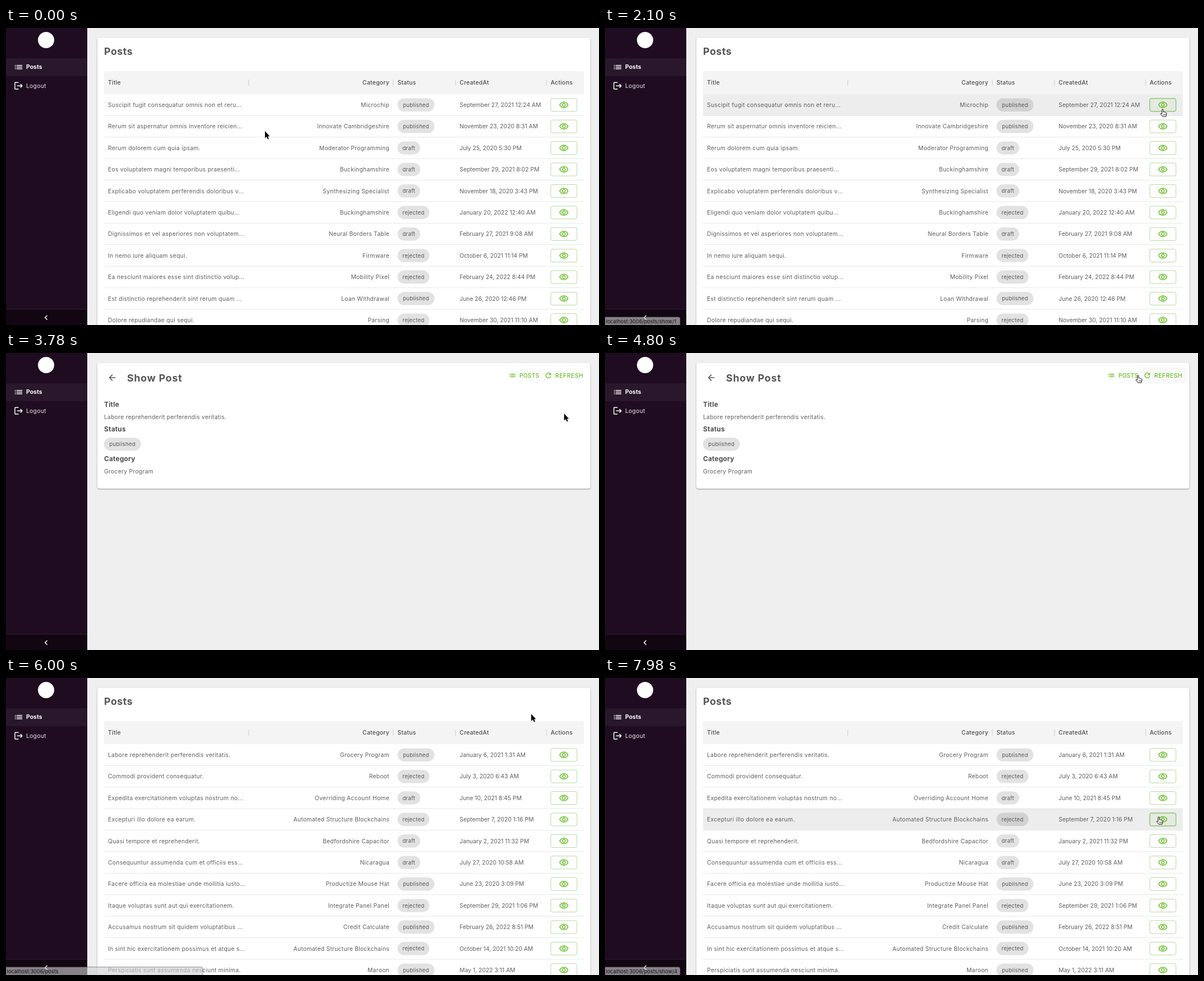
Write an HTML page that moves like this. It is 1058 by 530 pixels and loops after 8000 ms.

```html
<!DOCTYPE html>
<html lang="en">
<head>
<meta charset="utf-8">
<title>Posts admin</title>
<style>
html, body { margin: 0; width: 100%; height: 100%; overflow: hidden; background: #efefef; }
svg { display: block; }
text { font: 10.35px Inter, sans-serif; letter-spacing: .27px; fill: #5f5f5f; white-space: pre; }
.head { font-weight: 500; fill: #4c4c4c; }
.date { letter-spacing: 0; }
.end { text-anchor: end; }
.chip { font-size: 9.6px; text-anchor: middle; fill: #565656; }
.h1 { font-size: 17.7px; font-weight: 700; letter-spacing: .6px; fill: #545454; }
.wide { letter-spacing: .85px; }
.label { font-size: 11.8px; font-weight: 700; fill: #4c4c4c; }
.action { font-weight: 500; letter-spacing: .15px; fill: #67be23; }
.spaced { letter-spacing: .55px; }
.menu { fill: #e9e6e9; }
.active { font-weight: 700; fill: #fff; letter-spacing: .05px; }
.url { font-size: 9.2px; letter-spacing: 0; fill: #111; }
.card { fill: #fff; filter: drop-shadow(0 1px 1px rgba(0,0,0,.38)); }
.bubble rect { fill: rgba(208,208,211,.62); stroke: rgba(60,60,60,.55); }

.anim { animation: 8s step-end infinite; }
#list { animation-name: list; }
#first { animation-name: first; }
#second { animation-name: second; }
#show { animation-name: show; }
#band { animation-name: band; }
#press { animation-name: press; }
#refresh { animation-name: refresh; }
#posts { animation-name: posts; }
#arrow { animation-name: arrow; }
#hand { animation-name: hand; }
#url1 { animation-name: url1; }
#url2 { animation-name: url2; }
#url3 { animation-name: url3; }
#cursor { animation: path 8s linear infinite; }

@keyframes list { 0%, 68.25%, 100% { opacity: 1 } 28.5% { opacity: 0 } }
@keyframes first { 0% { opacity: 1 } 28.5%, 100% { opacity: 0 } }
@keyframes second { 0% { opacity: 0 } 28.5%, 100% { opacity: 1 } }
@keyframes show { 0%, 68.25%, 100% { opacity: 0 } 28.5% { opacity: 1 } }
@keyframes band {
  0%, 28.5% { opacity: 0; transform: translateY(0) }
  20.6%, 79.8% { opacity: 1; transform: translateY(0) }
  83.2% { opacity: 1; transform: translateY(38.4px) }
  86.7% { opacity: 1; transform: translateY(76.8px) }
  92.4%, 100% { opacity: 1; transform: translateY(115.2px) }
}
@keyframes press {
  0%, 28.5% { opacity: 0; transform: translateY(0) }
  20.6% { opacity: 1; transform: translateY(0) }
  89.6% { opacity: 1; transform: translateY(76.8px) }
  91.1% { opacity: 0; transform: translateY(76.8px) }
  93.65%, 100% { opacity: 1; transform: translateY(115.2px) }
}
@keyframes refresh { 0%, 60.4%, 100% { opacity: 0 } 52.5% { opacity: 1 } }
@keyframes posts { 0%, 68.25%, 100% { opacity: 0 } 60.4% { opacity: 1 } }
@keyframes hand {
  0%, 28.5%, 68.25%, 91.1% { opacity: 0 }
  17%, 52.5%, 89.6%, 93.65%, 100% { opacity: 1 }
}
@keyframes arrow {
  0%, 28.5%, 68.25%, 91.1% { opacity: 1 }
  17%, 52.5%, 89.6%, 93.65%, 100% { opacity: 0 }
}
@keyframes url1 { 0%, 29%, 100% { opacity: 0 } 21.75% { opacity: 1 } }
@keyframes url2 { 0%, 75.8%, 100% { opacity: 0 } 62.25% { opacity: 1 } }
@keyframes url3 { 0% { opacity: 0 } 94.2%, 100% { opacity: 1 } }
@keyframes path {
  0% { transform: translate(462px, 184px); animation-timing-function: ease-in-out }
  20%, 31% { transform: translate(995px, 145px) }
  33.75% { transform: translate(1001px, 141px) }
  41.25% { transform: translate(1001px, 141px); animation-timing-function: ease-in-out }
  56.25% { transform: translate(985px, 42px); animation-timing-function: ease-in-out }
  60%, 69.5% { transform: translate(951px, 40px) }
  75% { transform: translate(937px, 64px) }
  87.75% { transform: translate(966px, 207px) }
  95%, 100% { transform: translate(988px, 248px) }
}
</style>
</head>
<body>
<svg id="stage" width="1058" height="530" viewBox="0 0 1058 530"></svg>
<script>
const icons = {
  list: 'M3 13h2v-2H3v2zm0 4h2v-2H3v2zm0-8h2V7H3v2zm4 4h14v-2H7v2zm0 4h14v-2H7v2zM7 7v2h14V7H7z',
  logout: 'M17 7l-1.41 1.41L18.17 11H8v2h10.17l-2.58 2.58L17 17l5-5zM4 5h8V3H4c-1.1 0-2 .9-2 2v14c0 1.1.9 2 2 2h8v-2H4V5z',
  left: 'M15.41 7.41L14 6l-6 6 6 6 1.41-1.41L10.83 12z',
  back: 'M20 11H7.83l5.59-5.59L12 4l-8 8 8 8 1.41-1.41L7.83 13H20v-2z',
  refresh: 'M17.65 6.35C16.2 4.9 14.21 4 12 4c-4.42 0-7.99 3.58-7.99 8s3.57 8 7.99 8c3.73 0 6.84-2.55 7.73-6h-2.08c-.82 2.33-3.04 4-5.65 4-3.31 0-6-2.69-6-6s2.69-6 6-6c1.66 0 3.14.69 4.22 1.78L13 11h7V4l-2.35 2.35z',
  eye: 'M12 6c3.79 0 7.17 2.13 8.82 5.5C19.17 14.87 15.79 17 12 17s-7.17-2.13-8.82-5.5C4.83 8.13 8.21 6 12 6m0-2C7 4 2.73 7.11 1 11.5 2.73 15.89 7 19 12 19s9.27-3.11 11-7.5C21.27 7.11 17 4 12 4zm0 5c1.38 0 2.5 1.12 2.5 2.5S13.38 14 12 14s-2.5-1.12-2.5-2.5S10.62 9 12 9m0-2c-2.48 0-4.5 2.02-4.5 4.5S9.52 16 12 16s4.5-2.02 4.5-4.5S14.48 7 12 7z'
};
const chipWidth = { published: 66, draft: 40.5, rejected: 57 };

const firstRows = `Suscipit fugit consequatur omnis non et reru...|Microchip|published|September 27, 2021 12:24 AM
Rerum sit aspernatur omnis inventore reicien...|Innovate Cambridgeshire|published|November 23, 2020 8:31 AM
Rerum dolorem cum quia ipsam.|Moderator Programming|draft|July 25, 2020 5:30 PM
Eos voluptatem magni temporibus praesenti...|Buckinghamshire|draft|September 29, 2021 8:02 PM
Explicabo voluptatem perferendis doloribus v...|Synthesizing Specialist|draft|November 18, 2020 3:43 PM
Eligendi quo veniam dolor voluptatem quibu...|Buckinghamshire|rejected|January 20, 2022 12:40 AM
Dignissimos et vel asperiores non voluptatem...|Neural Borders Table|draft|February 27, 2021 9:08 AM
In nemo iure aliquam sequi.|Firmware|rejected|October 6, 2021 11:14 PM
Ea nesciunt maiores esse sint distinctio volup...|Mobility Pixel|rejected|February 24, 2022 8:44 PM
Est distinctio reprehenderit sint rerum quam ...|Loan Withdrawal|published|June 26, 2020 12:46 PM
Dolore repudiandae qui sequi.|Parsing|rejected|November 30, 2021 11:10 AM`;

const secondRows = `Labore reprehenderit perferendis veritatis.|Grocery Program|published|January 6, 2021 1:31 AM
Commodi provident consequatur.|Reboot|rejected|July 3, 2020 6:43 AM
Expedita exercitationem voluptas nostrum no...|Overriding Account Home|draft|June 10, 2021 8:45 PM
Excepturi illo dolore ea earum.|Automated Structure Blockchains|rejected|September 7, 2020 1:16 PM
Quasi tempore et reprehenderit.|Bedfordshire Capacitor|draft|January 2, 2021 11:32 PM
Consequuntur assumenda cum et officiis ess...|Nicaragua|draft|July 27, 2020 10:58 AM
Facere officia ea molestiae unde mollitia iusto...|Productize Mouse Hat|published|June 23, 2020 3:09 PM
Itaque voluptas sunt aut qui exercitationem.|Integrate Panel Panel|rejected|September 29, 2021 1:06 PM
Accusamus nostrum sit quidem voluptatibus ...|Credit Calculate|published|February 26, 2022 8:51 PM
In sint hic exercitationem possimus et atque s...|Automated Structure Blockchains|rejected|October 14, 2021 10:20 AM
Perspiciatis sunt assumenda nesciunt minima.|Maroon|published|May 1, 2022 3:11 AM`;

const text = (x, y, s, cls = '') => `<text x="${x}" y="${y}" class="${cls}">${s}</text>`;
const rect = (x, y, w, h, fill, more = '') =>
  `<rect x="${x}" y="${y}" width="${w}" height="${h}" fill="${fill}" ${more}/>`;
const icon = (name, cx, cy, color, size = 17.7) =>
  `<path d="${icons[name]}" fill="${color}" transform="translate(${cx - size / 2} ${cy - size / 2}) scale(${size / 24})"/>`;
const group = (id, body, cls = 'anim') => `<g id="${id}" class="${cls}">${body}</g>`;
const chip = (x, cy, status) => {
  const w = chipWidth[status];
  return rect(x, cy - 11.8, w, 23.6, 'rgba(0,0,0,.115)', 'rx="11.8"') +
    text(x + w / 2, cy + 3.6, status, 'chip');
};

const row = (line, i) => {
  const [title, category, status, date] = line.split('|');
  const y = 137.2 + i * 38.4, base = y + 3.8;
  return text(182, base, title) + text(684, base, category, 'end') +
    chip(698.5, y, status) + text(809.3, base, date, 'date') +
    rect(972, y - 11.4, 46.7, 23, 'none', 'rx="3" stroke="#b4d9a0"') +
    icon('eye', 995.3, y + .3, '#67be23') +
    rect(175, y + 18.7, 856, .8, '#e2e2e2');
};
const table = rows => rows.split('\n').map(row).join('');

const sidebar = rect(0, 0, 145, 530, '#1f0c21') + rect(0, 54, 145, 32, '#29172b') +
  rect(0, 502, 145, 28, '#110612') + rect(0, 501.5, 145, .8, '#352638') +
  '<circle cx="71.5" cy="21.5" r="14.5" fill="#fff"/>' +
  icon('list', 22.5, 69.8, '#fff') + text(36, 73.4, 'Posts', 'active') +
  icon('logout', 22.5, 103.2, '#fff') + text(36, 106.8, 'Logout', 'menu') +
  icon('left', 71.6, 516.8, '#fff');

const columns = text(182, 101.3, 'Title', 'head') + text(684, 101.3, 'Category', 'head end') +
  text(698.5, 101.3, 'Status', 'head') + text(809.3, 101.3, 'CreatedAt', 'head') +
  text(971.7, 101.3, 'Actions', 'head') +
  [433, 691, 802, 964.5].map(x => rect(x - .6, 92, 1.2, 11, '#d3d3d3')).join('');

const list = rect(163, 17.5, 879.5, 540, '#fff', 'rx="4" class="card"') +
  text(175, 47.5, 'Posts', 'h1') +
  '<path d="M175 118V80a3 3 0 0 1 3-3H1028a3 3 0 0 1 3 3V118Z" fill="#f4f4f4"/>' + columns +
  rect(175, 118, 856, 38.2, '#ededed', 'id="band" class="anim"') +
  group('first', table(firstRows)) + group('second', table(secondRows)) +
  rect(972, 125.8, 46.7, 23, 'rgba(103,190,35,.05)', 'id="press" class="anim" rx="3" stroke="#7fbb5b"');

const show = rect(163, 17.5, 879.5, 224.5, '#fff', 'rx="4" class="card"') +
  icon('back', 189.5, 44, '#555') + text(216, 50.5, 'Show Post', 'h1 wide') +
  rect(892, 26, 64, 28, '#f8f9f7', 'id="posts" class="anim" rx="3"') +
  rect(957, 26, 81, 28, '#f8f9f7', 'id="refresh" class="anim" rx="3"') +
  icon('list', 903, 40, '#67be23', 14.8) + text(916, 43.8, 'POSTS', 'action') +
  icon('refresh', 967.5, 40, '#67be23', 14.8) + text(980, 43.8, 'REFRESH', 'action spaced') +
  text(175, 95.8, 'Title', 'label') + text(175, 117.7, 'Labore reprehenderit perferendis veritatis.') +
  text(175, 140, 'Status', 'label') + chip(174.7, 162.7, 'published') +
  text(175, 193, 'Category', 'label') + text(175, 214.8, 'Grocery Program');

const bubble = (id, w, path) => group(id,
  rect(-3, 515.8, w + 3, 20, '', 'rx="3"') + text(1.5, 526.8, 'localhost:3006' + path, 'url'), 'anim bubble');

const cursor = group('arrow',
  '<path d="M0 0V12.5L2.9 9.9L5 14.5L7 13.6L5 9.2H8.6Z" stroke="#fff" stroke-width="1.4" paint-order="stroke"/>') +
  group('hand', '<path d="M-1.2 .8C-1.2-.6 .9-.6 1 .8L1.2 5C3 4.2 3.6 5 3.8 5.6C5 5 5.6 5.6 5.8 6.4C6.8 6 7.2 6.8 7 8L6 13H0L-3.6 8.6C-4.3 7.4-2.9 6.6-1.2 8.3Z" fill="#fff" stroke="#111" stroke-linejoin="round"/>' +
  '<path d="M1.6 8.5V11M3.3 8.5V11M5 8.5V11" stroke="#111" stroke-width=".7"/>');

document.getElementById('stage').innerHTML =
  rect(0, 0, 1058, 530, '#efefef') + group('list', list) + group('show', show) + sidebar +
  bubble('url1', 134, '/posts/show/1') + bubble('url2', 351, '/posts') +
  bubble('url3', 134, '/posts/show/4') + group('cursor', cursor, '');
</script>
</body>
</html>
```
